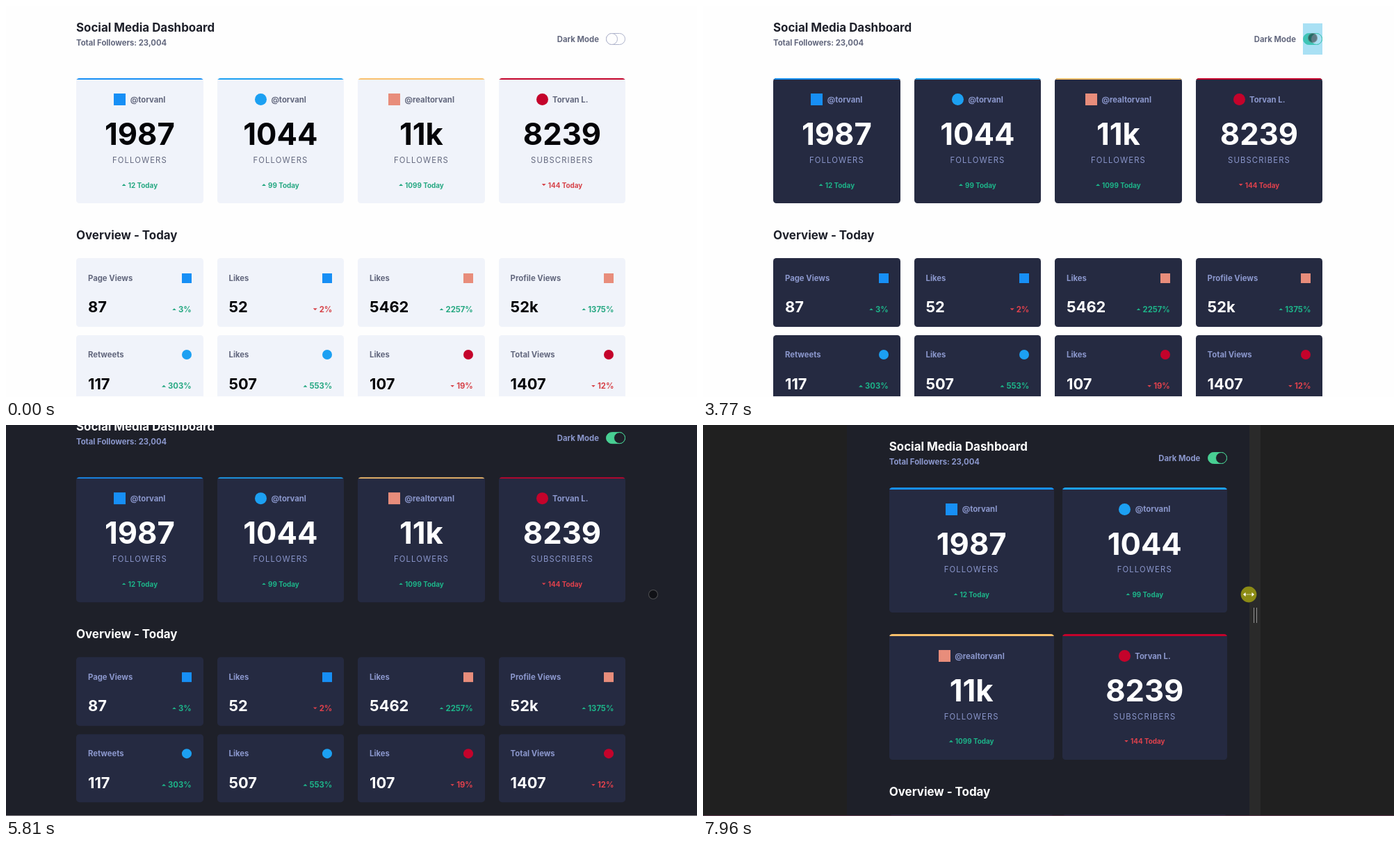
Recreate the animation shown at these times as an HTML page. Size 994 by 563 pixels, loop 8000 ms.

```html
<!DOCTYPE html>
<html lang="en">
<head>
<meta charset="utf-8">
<title>Social Media Dashboard</title>
<style>
  html, body { margin: 0; width: 100%; height: 100%; overflow: hidden; }
  #stage {
    position: relative; width: 994px; height: 563px; overflow: hidden;
    background: var(--bg); font: 700 11.3px/0 Inter, sans-serif;
    font-optical-sizing: none; white-space: nowrap;
  }
  #stage div, #stage i, #resize { position: absolute; box-sizing: border-box; }
  #page { top: 0; height: 602px; }
  .head { left: 0; font-size: 16.9px; color: var(--head); }
  .sub { left: 0; color: var(--sub); }
  #pill {
    right: 0; top: 38.5px; width: 28px; height: 17px; border-radius: 9px;
    border: 1.7px solid var(--pill); background: var(--fill);
  }
  #knob {
    top: 38.5px; width: 17px; height: 17px; border-radius: 50%;
    border: 1.7px solid var(--pill); background: var(--bg);
  }
  #tap { right: 0; top: 24.5px; width: 28px; height: 45px; background: rgba(51, 181, 229, .42); }
  .card { border-radius: 4.5px; background: var(--card); color: var(--label); overflow: hidden; }
  .big::before { content: ""; position: absolute; inset: 0 0 auto; height: 2.8px; background: var(--brand); }
  .row { left: 0; right: 0; height: 0; display: flex; justify-content: center; align-items: center; }
  .row.end { right: 17px; justify-content: flex-end; }
  #stage .row i { position: static; flex: none; }
  .mark { width: 17px; height: 17px; margin-right: 6.5px; background: var(--brand); }
  .small .mark { width: 14px; height: 14px; margin: 0; }
  .round { border-radius: 50%; }
  .total { font-size: 43.6px; color: var(--num); }
  .unit { font-weight: 400; letter-spacing: .1em; }
  .today { font-size: 9.9px; }
  .up { color: var(--up); }
  .down { color: var(--down); }
  .tip { width: 6px; height: 3px; margin-right: 3px; background: currentColor; clip-path: polygon(0 100%, 50% 0, 100% 100%); }
  .down .tip { clip-path: polygon(0 0, 100% 0, 50% 100%); }
  .label { left: 17px; top: 28.5px; }
  .count { left: 17px; top: 70px; font-size: 21.8px; color: var(--num); }
  #cursor {
    width: 14px; height: 14px; margin: -7px; border-radius: 50%;
    background: rgba(0, 0, 0, .45); border: 1px solid rgba(190, 190, 190, .35);
  }
  .side { top: 0; height: 563px; background: #202020; }
  #left { left: 0; }
  #right { width: 994px; }
  #strip { left: 0; top: 0; width: 16px; height: 563px; background: #2a2a2a; }
  #grip { left: 6px; top: 263px; width: 5px; height: 22px; border: solid #929292; border-width: 0 1.2px; }
  #resize { width: 24px; height: 24px; top: 232px; margin-left: -12px; }
  #line { left: 0; top: 562px; width: 994px; height: 1px; }
</style>
</head>
<body>
<div id="stage">
  <div id="page">
    <div class="head" style="top:30.5px">Social Media Dashboard</div>
    <div class="sub" style="top:52.5px">Total Followers: 23,004</div>
    <div class="sub" style="top:47.5px;left:auto;right:38.5px">Dark Mode</div>
    <div id="pill"></div>
    <div id="knob"></div>
    <div id="tap"></div>
    <div class="head" id="overview">Overview - Today</div>
  </div>
  <div class="side" id="left"></div>
  <div class="side" id="right"><div id="strip"><div id="grip"></div></div></div>
  <div id="cursor"></div>
  <svg id="resize" viewBox="-12 -12 24 24">
    <circle r="11.4" fill="#8c8b15"/>
    <path d="M-5 0H5" stroke="#fff" stroke-width="1.2" stroke-dasharray="1.4 1"/>
    <path d="M-8 0l3.5-3v6zM8 0l-3.5-3v6z" fill="#fff"/>
  </svg>
  <div id="line"></div>
</div>
<script>
const $ = id => document.getElementById(id);
const stage = $('stage'), page = $('page');
const LOOP = 8000, MAX_SCROLL = 38.5;

// colour and shape of each network's mark
const NETS = {
  a: ['#178ff5', ''],
  b: ['#1ca0f2', 'round'],
  c: ['#f9c06c', ''],
  d: ['#c4032b', 'round']
};
const SOFT = '#e88d7b';

const TOTALS = [
  ['a', '@torvanl', '1987', 'FOLLOWERS', 'up', '12'],
  ['b', '@torvanl', '1044', 'FOLLOWERS', 'up', '99'],
  ['c', '@realtorvanl', '11k', 'FOLLOWERS', 'up', '1099'],
  ['d', 'Torvan L.', '8239', 'SUBSCRIBERS', 'down', '144']
];
const STATS = [
  ['a', 'Page Views', '87', 'up', '3%'],
  ['a', 'Likes', '52', 'down', '2%'],
  ['c', 'Likes', '5462', 'up', '2257%'],
  ['c', 'Profile Views', '52k', 'up', '1375%'],
  ['b', 'Retweets', '117', 'up', '303%'],
  ['b', 'Likes', '507', 'up', '553%'],
  ['d', 'Likes', '107', 'down', '19%'],
  ['d', 'Total Views', '1407', 'down', '12%']
];

function card(kind, net, html) {
  const el = document.createElement('div');
  el.className = 'card ' + kind;
  el.style.setProperty('--brand', NETS[net][0]);
  el.innerHTML = html;
  page.appendChild(el);
  return el;
}
const mark = net =>
  `<i class="mark ${NETS[net][1]}"${net === 'c' ? ` style="background:${SOFT}"` : ''}></i>`;
const row = (y, cls, html) => `<div class="row ${cls}" style="top:${y}px">${html}</div>`;
const tip = '<i class="tip"></i>';

const totals = TOTALS.map(([net, name, n, unit, dir, diff]) => card('big', net,
  row(31.3, '', mark(net) + name) +
  row(81.8, 'total', n) +
  row(118.5, 'unit', unit) +
  row(154, 'today ' + dir, tip + diff + ' Today')));

const stats = STATS.map(([net, name, n, dir, diff]) => card('small', net,
  `<div class="label">${name}</div><div class="count">${n}</div>` +
  row(28.5, 'end', mark(net)) +
  row(73.5, 'end ' + dir, tip + diff)));

const clamp = x => Math.max(0, Math.min(1, x));
const lerp = (a, b, p) => a + (b - a) * p;
const smooth = (t, a, b) => { const p = clamp((t - a) / (b - a)); return p * p * (3 - 2 * p); };
const mix = (a, b, p) => `rgb(${a.map((v, i) => Math.round(lerp(v, b[i], p)))})`;

// the picture moves in n held steps, the first at a and the last at b
const step = (t, a, b, n) =>
  t < a ? 0 : Math.min(n, Math.floor((t - a) * (n - 1) / (b - a) + 1e-6) + 1) / n;

function along(pts, u) {
  const s = u * (pts.length - 1), i = Math.min(pts.length - 2, Math.floor(s));
  return [0, 1].map(k => lerp(pts[i][k], pts[i + 1][k], s - i));
}

const SCROLLS = [
  [1260, 1400, 3, 0, 1],
  [2190, 2400, 4, 1, 0],
  [4800, 5000, 4, 0, 1],
  [5810, 6010, 4, 1, 0]
];
const MOVES = [
  [460, 870, 7, [[980, 592], [962, 486], [950, 410], [939, 337]]],
  [2730, 3510, 12, [[939, 337], [938, 315], [921, 245], [900, 180], [884, 95], [877, 46]]],
  [4390, 5140, 11, [[877, 46], [905, 72], [930, 102], [945, 135], [950, 157], [947, 194], [939, 224]]],
  [5210, 5610, 7, [[939, 224], [931, 244]]],
  [5950, 6350, 7, [[931, 244], [1003, 244]]]
];
const active = (list, t) => list.filter(m => t >= m[0]).pop() || list[0];

// name: light, dark
const PAGE_INK = { head: [[30, 32, 42], [255, 255, 255]], sub: [[99, 104, 126], [139, 151, 204]] };
const CARD_INK = {
  card: [[240, 243, 250], [37, 42, 65]],
  label: [[99, 104, 126], [139, 151, 204]],
  num: [[4, 4, 8], [255, 255, 255]],
  up: [[38, 168, 130], [29, 180, 137]],
  down: [[214, 66, 72], [224, 65, 76]],
  pill: [[174, 179, 203], [72, 207, 147]],
  fill: [[254, 254, 254], [72, 207, 147]]
};
const WHITE = [254, 254, 254], NIGHT = [30, 32, 41];

function paint(inks, p) {
  for (const key in inks) stage.style.setProperty('--' + key, mix(...inks[key], p));
}

function place(list, cols, width, gap, y, h, rowGap) {
  const w = (width - gap * (cols - 1)) / cols;
  list.forEach((el, i) => Object.assign(el.style, {
    left: (i % cols) * (w + gap) + 'px',
    top: y + Math.floor(i / cols) * (h + rowGap) + 'px',
    width: w + 'px',
    height: h + 'px'
  }));
}

function layout(left, w) {
  const wide = w > 723, cols = wide ? 4 : 2, width = .8 * w, gap = .02 * w;
  const top = wide ? 103.5 : 89.8;
  const end = top + (wide ? 180.5 : 392);
  page.style.left = left + .1 * w + 'px';
  page.style.width = width + 'px';
  place(totals, cols, width, gap, top, 180.5, 31);
  $('overview').style.top = end + 45.8 + 'px';
  place(stats, cols, width, gap, end + 79.2, 98.7, 11.8);
}

function draw(t) {
  const cards = smooth(t, 3570, 3740);
  const back = smooth(t, 3770, 4170);
  const slide = smooth(t, 3570, 3790);
  paint(CARD_INK, cards);
  paint(PAGE_INK, smooth(t, 3905, 4305));
  stage.style.setProperty('--bg', mix(WHITE, NIGHT, back));
  $('knob').style.right = lerp(11, 0, slide) + 'px';
  $('tap').style.display = t >= 3570 && t < 3900 ? '' : 'none';

  const [a, b, n, from, to] = active(SCROLLS, t);
  page.style.transform = `translateY(${-MAX_SCROLL * lerp(from, to, step(t, a, b, n))}px)`;

  const m = active(MOVES, t), [x, y] = along(m[3], step(t, m[0], m[1], m[2]));
  $('cursor').style.left = x + 'px';
  $('cursor').style.top = y + 'px';

  const drag = t >= 7340;
  const u = drag ? (step(t, 7340, 7960, 10) * 10 - 1) / 9 : 0;
  const p = 1 - Math.pow(1 - clamp(u), 1.3);
  layout(lerp(2.2, 207, p), lerp(988, 607.5, p));
  $('left').style.width = lerp(0, 207, p) + 'px';
  $('right').style.left = lerp(994, 786, p) + 'px';
  $('resize').style.left = lerp(990, 785, p) + 'px';
  $('resize').style.display = drag ? '' : 'none';
  $('line').style.background = drag ? 'rgb(98,64,82)' : mix(WHITE, [140, 134, 140], back);
}

function frame(now) {
  draw(now % LOOP);
  requestAnimationFrame(frame);
}
draw(0);
requestAnimationFrame(frame);
</script>
</body>
</html>
```
